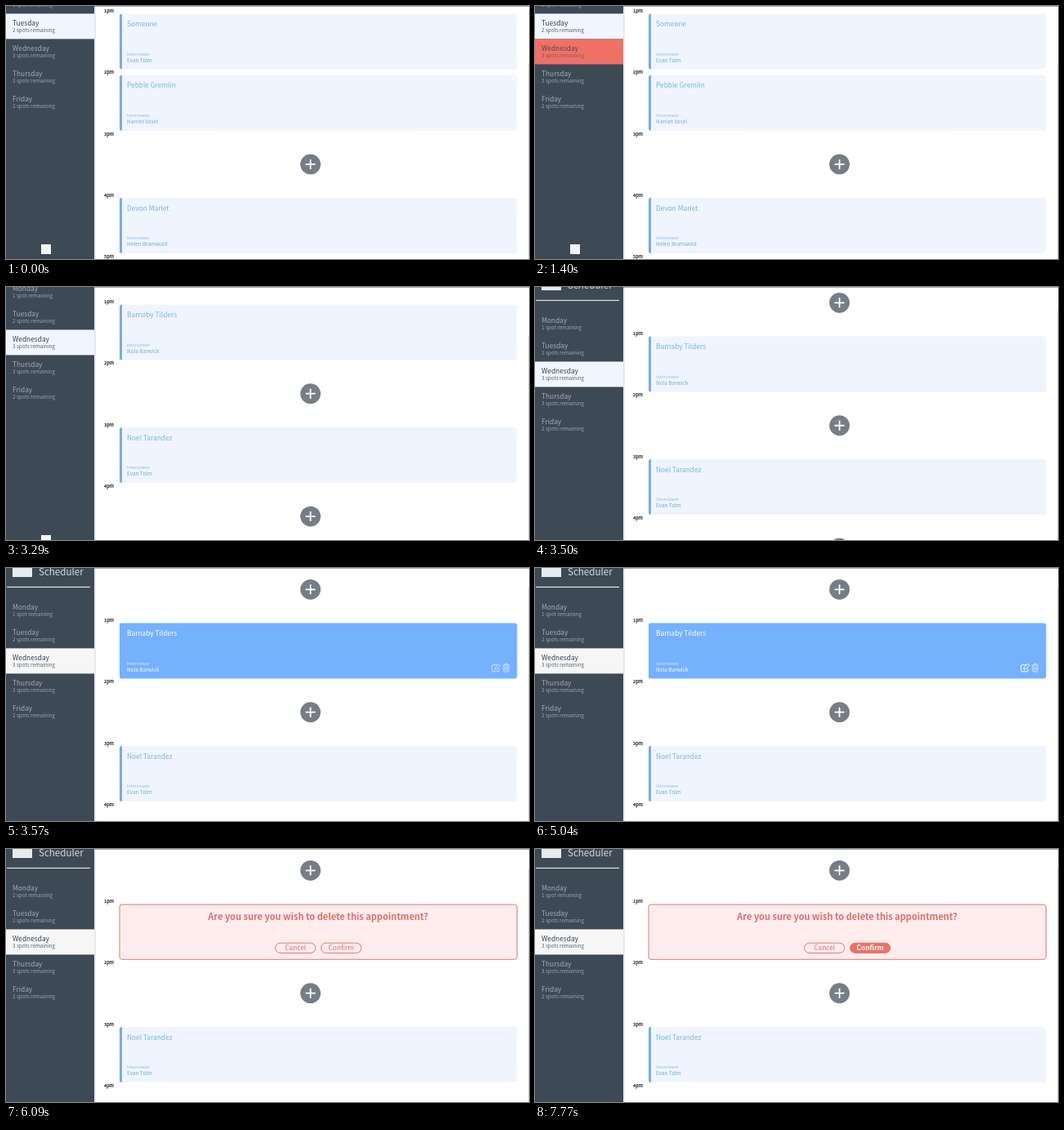
Write an HTML page that moves like this. It is 640 by 310 pixels and loops after 8 s.

```html
<!DOCTYPE html>
<html lang="en">
<head>
<meta charset="utf-8">
<title>Scheduler</title>
<style>
html, body { margin: 0; width: 100%; height: 100%; overflow: hidden; background: #fff; }
svg { display: block; width: 640px; height: 310px; }
text { font-family: "Noto Sans CJK SC", "Noto Sans CJK JP", "Open Sans", sans-serif; }
.day rect { fill: none; }
.day .title { font-size: 8.35px; fill: #a3abb4; }
.day .spots { font-size: 6.3px; font-weight: 300; fill: #9ca5af; }
.day.hover rect { fill: #ef7166; }
.day.hover .title { fill: #584750; }
.day.hover .spots { fill: #87585c; }
.day.selected rect { fill: var(--selected); }
.day.selected .title { fill: #35414e; }
.day.selected .spots { fill: #56616d; }
.time { font-size: 5.5px; font-weight: 700; fill: #222; }
.card .box { fill: #eff4ff; }
.card .bar { fill: #78ade0; }
.card .name { font-size: 8.35px; fill: #78b4e0; }
.card .role { font-size: 5.25px; font-weight: 300; fill: #8cb9e2; }
.card .person { font-size: 6.4px; fill: #72a9d8; }
.card.hover .box, .card.hover .bar { fill: #75b1ff; }
.card.hover .name, .card.hover .person { fill: #fff; }
.card.hover .role { fill: #deedff; }
.icon { fill: none; stroke: #fff; stroke-width: 1; stroke-linejoin: round; stroke-linecap: round; }
.plus circle { fill: #757d86; }
.plus path { stroke: #fff; stroke-width: 1.8; }
.dialog rect { stroke: #dc7a75; }
.dialog text { fill: #d9716c; text-anchor: middle; }
.dialog .question { font-size: 11px; font-weight: 700; }
.dialog .button { font-size: 8.3px; font-weight: 500; }
</style>
</head>
<body>
<svg viewBox="0 0 640 310" id="stage"></svg>
<script>
const LOOP = 8000, STEP = 70, SCROLL = 58, SLOT = 75.2;
const HOVER_DAY = 1400, PICK_DAY = 1680, HOVER_CARD = 3570;
const HOVER_EDIT = 4900, HOVER_TRASH = 5320, ASK = 6020, HOVER_CONFIRM = 7070;

const days = [['Monday', 1], ['Tuesday', 2], ['Wednesday', 3], ['Thursday', 3], ['Friday', 2]];
const tuesday = {
  0: ['Someone', 'Evan Tolm'],
  1: ['Pebble Gremlin', 'Harriet Vosel'],
  3: ['Devon Marlet', 'Helen Bramwold']
};
const wednesday = {
  0: ['Barnaby Tilders', 'Nola Barwick'],
  2: ['Noel Tarandez', 'Evan Tolm']
};

const text = (x, y, cls, s) => `<text x="${x}" y="${y}" class="${cls}">${s}</text>`;

const dayItem = ([name, spots], i) => `<g class="day" transform="translate(0 ${9.4 + 31 * (i - 1)})">
  <rect width="108" height="31"/>
  ${text(8, 14.8, 'title', name)}
  ${text(8, 23, 'spots', `${spots} spot${spots > 1 ? 's' : ''} remaining`)}</g>`;

const card = ([name, person]) => `<g class="card">
  <rect class="box" x="139" width="486.5" height="68" rx="3"/>
  <path class="bar" d="M142 0V68H141.5A2.5 2.5 0 0 1 139 65.5V2.5A2.5 2.5 0 0 1 141.5 0Z"/>
  ${text(148, 15.8, 'name', name)}
  ${text(148, 51.4, 'role', 'Interviewer')}
  ${text(148, 59.3, 'person', person)}</g>`;

const plus = `<g class="plus" transform="translate(372.6 26.2)"><g transform="translate(0 7.8)">
  <circle r="12.4"/><path d="M-6 0H6M0-6V6"/></g></g>`;

const schedule = (id, booked) => {
  let out = '';
  for (let k = -1; k < 5; k++) {
    out += `<g transform="translate(0 ${9.5 + SLOT * k})">
      ${k < 0 ? '' : text(120, -1.3, 'time', `${k + 1}pm`)}
      ${booked[k] ? card(booked[k]) : k < 4 ? plus : ''}</g>`;
  }
  return `<g id="${id}">${out}</g>`;
};

const button = (id, x, label) => `<g id="${id}">
  <rect x="${x}" y="47.7" width="49.2" height="12.2" rx="6.1" fill="none"/>
  ${text(x + 24.6, 56.9, 'button', label)}</g>`;

const stage = document.getElementById('stage');
stage.innerHTML = `
<rect width="640" height="310" fill="#fff"/>
<rect x="108" width="2" height="310" fill="#e6e8eb"/>
<rect width="108" height="310" fill="#3e4956"/>
<g id="page">
  <rect x="8" y="-71" width="24" height="24" fill="#e8ebee"/>
  <text x="40" y="-49" font-size="11.6" font-weight="300" fill="#d5d9de">Scheduler</text>
  <rect x="1" y="-35.2" width="102" height="1.2" fill="#dfe2e5"/>
  ${days.map(dayItem).join('')}
  <rect x="43" y="292" width="12" height="12" fill="#f4f4f4"/>
  ${schedule('tuesday', tuesday)}
  ${schedule('wednesday', wednesday)}
  <g id="icons" transform="translate(0 9.5)" class="icon">
    <path id="edit" d="M600.5 51.2H595.8Q594.8 51.2 594.8 52.2V58.4Q594.8 59.4 595.8 59.4H602Q603 59.4 603 58.4V56M598.2 56.4L598.6 54.2L603 49.8L604.9 51.7L600.5 56.1Z"/>
    <path id="trash" d="M608.3 51.5H615.9M610.5 51.3L611 50H613.2L613.7 51.3M609.1 51.8V58.6Q609.1 59.6 610.1 59.6H614.1Q615.1 59.6 615.1 58.6V51.8M611 53.5V57.8M613.2 53.5V57.8"/>
  </g>
  <g id="dialog" class="dialog" transform="translate(0 9.5)">
    <rect x="139" y=".5" width="486.3" height="67.3" rx="3" fill="#ffecec"/>
    ${text(382, 19.2, 'question', 'Are you sure you wish to delete this appointment?')}
    ${button('cancel', 329.6, 'Cancel')}
    ${button('confirm', 385.6, 'Confirm')}
  </g>
</g>
<rect x="108" width="532" height="1" fill="#a9adb3"/>
<rect id="thumb" x="639" width="1" height="310" fill="#dcdee2"/>`;

const $ = id => document.getElementById(id);
const dayNodes = stage.querySelectorAll('.day');
const firstCard = $('wednesday').querySelector('.card');
const show = (node, on) => node.setAttribute('visibility', on ? 'visible' : 'hidden');
const ramp = (t, from, to) => Math.min(1, Math.max(0, (t - from) / (to - from)));

function scrollAt(t) {
  const q = ramp(t, 2960, 3570) ** 2;
  return SCROLL * q * q * (3 - 2 * q);
}

function draw(t) {
  const picked = t >= PICK_DAY, asking = t >= ASK, hovering = t >= HOVER_CARD && !asking;
  const scroll = scrollAt(t);
  $('page').setAttribute('transform', `translate(0 ${scroll.toFixed(2)})`);
  $('thumb').setAttribute('y', 70 - scroll * 0.8);
  stage.style.setProperty('--selected', t < HOVER_CARD ? '#f1f5ff' : '#f6f6f6');

  dayNodes.forEach((node, i) => {
    node.classList.toggle('selected', i === (picked ? 2 : 1));
    node.classList.toggle('hover', i === 2 && t >= HOVER_DAY && !picked);
  });
  show($('tuesday'), !picked);
  show($('wednesday'), picked);

  firstCard.classList.toggle('hover', hovering);
  show(firstCard, picked && !asking);
  show($('icons'), hovering);
  const trash = ramp(t, HOVER_TRASH - STEP, HOVER_TRASH + 2 * STEP);
  const edit = ramp(t, HOVER_EDIT - STEP, HOVER_EDIT + 2 * STEP) - trash;
  $('edit').setAttribute('opacity', 0.65 + 0.35 * edit);
  $('trash').setAttribute('opacity', 0.65 + 0.35 * trash);

  show($('dialog'), asking);
  const [box, label] = $('confirm').children, filled = t >= HOVER_CONFIRM;
  box.setAttribute('fill', filled ? '#e57368' : 'none');
  label.style.fill = filled ? '#fff' : '';
  label.style.fontWeight = filled ? 700 : '';
}

function tick() {
  const t = performance.now() % LOOP;
  draw(Math.floor(t / STEP) * STEP);
  requestAnimationFrame(tick);
}
tick();
</script>
</body>
</html>
```
